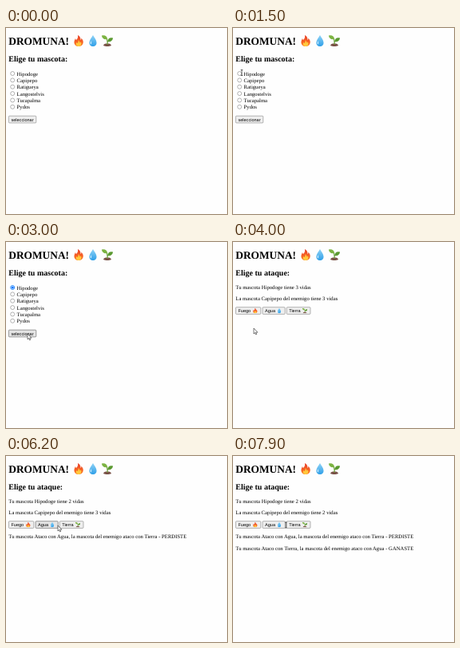
Recreate the animation shown at these times as an HTML page. Size 277 px wide and 233 px high, loop 8 s.

```html
<!DOCTYPE html>
<html lang="es">
<head>
<meta charset="utf-8">
<title>DROMUNA!</title>
<style>
html, body { margin: 0; width: 277px; height: 233px; overflow: hidden; background: #fefefe; }
svg { display: block; }
text { font: 6.69px "Liberation Serif", "Times New Roman", serif; fill: #000; text-rendering: geometricPrecision; white-space: pre; }
.h1 { font-size: 13.37px; font-weight: bold; }
.h2 { font-size: 10.03px; font-weight: bold; }
.btn text { font: 5.57px "Liberation Sans", Arial, sans-serif; }
.btn rect { fill: #efefef; stroke: #767676; stroke-width: .55; }
.btn.hot rect { fill: #e4e4e4; stroke: #4f4f4f; }
.btn.down rect { fill: #f5f5f5; stroke: #8d8d8d; }
.ring { fill: #fff; stroke: #767676; stroke-width: .55; }
.on .ring { stroke: #0075ff; stroke-width: .8; }
.dot { fill: #0075ff; visibility: hidden; }
.on .dot { visibility: visible; }
</style>
</head>
<body>
<svg id="stage" width="277" height="233" viewBox="0 0 277 233">
  <defs>
    <linearGradient id="heat" x1="0" y1="0" x2="0" y2="1">
      <stop offset="0" stop-color="#e8402c"/><stop offset="1" stop-color="#ff7a1f"/>
    </linearGradient>
    <linearGradient id="wet" x1="0" y1="0" x2="0" y2="1">
      <stop offset="0" stop-color="#8fd3f6"/><stop offset="1" stop-color="#2f9fe8"/>
    </linearGradient>
    <symbol id="fire" viewBox="0 0 28 28">
      <path fill="url(#heat)" d="M12 0C18 3 19 8 19 12C21 11 21 9 20 7C25 11 26 15 25 20C24 25 19 28 14 28C8 28 3 24 3 18C3 14 5 11 6 8C7 10 7 11 8 12C12 9 13 5 12 0Z"/>
      <path fill="#ffc83d" d="M13 12C17 15 16 18 18 19C19 18 19 17 19 16C23 21 20 28 14 28C8 28 6 22 9 18C10 19 10 20 11 20C13 18 14 15 13 12Z"/>
    </symbol>
    <symbol id="drop" viewBox="0 0 28 28">
      <path fill="url(#wet)" d="M14 0C17 6 23 12 23 19C23 24.500 19 28 14 28S5 24.500 5 19C5 12 11 6 14 0Z"/>
      <path fill="#d4f0ff" d="M10 14C7 18 7 21 9 23C11 22 10 18 10 14Z"/>
    </symbol>
    <symbol id="sprout" viewBox="0 0 28 28">
      <path fill="#795046" d="M4 26C6 21 10 21 14 21S22 21 24 26C21 28.500 7 28.500 4 26Z"/>
      <path fill="none" stroke="#689f38" stroke-width="2.500" d="M14 23C15 18 14 14 13 9M14 17C16 14 18 13 21 12"/>
      <path fill="#7cb342" d="M14 10C6 12 1 8 0 1C8 -1 14 3 14 10Z"/>
      <path fill="#5b9a32" d="M15 16C15 8 20 5 28 7C27 14 22 18 15 16Z"/>
    </symbol>
  </defs>
  <rect width="277" height="233" fill="#fefefe"/>
</svg>
<script>
const NS = 'http://www.w3.org/2000/svg';
const stage = document.getElementById('stage');
const LOOP = 8000;

function add(parent, tag, attrs = {}, content) {
  const el = document.createElementNS(NS, tag);
  for (const k in attrs) el.setAttribute(k, attrs[k]);
  if (content) el.textContent = content;
  return parent.appendChild(el);
}
const label = (parent, x, y, str, cls = '') => add(parent, 'text', { x, y, class: cls }, str);
const icon = (parent, id, cx, cy, size) =>
  add(parent, 'use', { href: '#' + id, x: cx - size / 2, y: cy - size / 2, width: size, height: size });

function button(parent, x, y, w, str, id, cx) {
  const g = add(parent, 'g', { class: 'btn' });
  add(g, 'rect', { x, y, width: w, height: 8.7, rx: 1 });
  label(g, x + 3, y + 6.3, str);
  if (id) icon(g, id, cx, y + 4.4, 6.5);
  return g;
}
const show = (el, on) => el.setAttribute('visibility', on ? 'visible' : 'hidden');
function press(el, hot, down) {
  el.setAttribute('class', 'btn' + (down ? ' down' : hot ? ' hot' : ''));
}

label(stage, 3.3, 20.7, 'DROMUNA!', 'h1');
icon(stage, 'fire', 91, 16, 14.2);
icon(stage, 'drop', 109, 16, 14.2);
icon(stage, 'sprout', 127, 16, 14.2);

// Pet selection
const pick = add(stage, 'g');
label(pick, 3.3, 42, 'Elige tu mascota:', 'h2');
const radios = ['Hipodoge', 'Capipepo', 'Ratigueya', 'Langostelvis', 'Tucapalma', 'Pydos'].map((name, i) => {
  const g = add(pick, 'g');
  const cy = 57 + i * 8.36;
  add(g, 'circle', { class: 'ring', cx: 8.2, cy, r: 2.5 });
  add(g, 'circle', { class: 'dot', cx: 8.2, cy, r: 1.55 });
  label(g, 13.6, cy + 2.6, name);
  return g;
});
const choose = button(pick, 3.4, 110.2, 34.4, 'seleccionar');

// Attack
const fight = add(stage, 'g');
label(fight, 3.3, 42, 'Elige tu ataque:', 'h2');
const mine = label(fight, 3.3, 59, ' ');
const foe = label(fight, 3.3, 73.2, ' ');
button(fight, 3.4, 81.7, 31.4, 'Fuego', 'fire', 27.8);
const agua = button(fight, 37, 81.7, 28.2, 'Agua', 'drop', 58);
const tierra = button(fight, 67.2, 81.7, 29.8, 'Tierra', 'sprout', 90);
const lost = label(fight, 3.3, 103.4, 'Tu mascota Ataco con Agua, la mascota del enemigo ataco con Tierra - PERDISTE');
const won = label(fight, 3.3, 117.6, 'Tu mascota Ataco con Tierra, la mascota del enemigo ataco con Agua - GANASTE');

const arrow = add(stage, 'path', {
  d: 'M0 0V7L1.600 5.600L2.700 8L3.700 7.500L2.700 5.200H4.900Z',
  fill: '#fff', stroke: '#222', 'stroke-width': .6
});
const beam = add(stage, 'path', {
  d: 'M-1.300 -3.500H1.300M0 -3.500V3.500M-1.300 3.500H1.300',
  fill: 'none', stroke: '#222', 'stroke-width': .7
});

// time, x, y
const track = [
  [1000, 206, 135], [1400, 11, 56], [1650, 11, 56], [1800, 8, 57], [2100, 8, 57],
  [2600, 27, 115], [3300, 27, 115], [3600, 26, 108], [4100, 26, 108],
  [4600, 47, 81], [5500, 47, 81], [6000, 65, 87], [6250, 65, 87],
  [6500, 78, 86], [7100, 78, 86], [7400, 66.3, 86.5], [8000, 66.3, 86.5]
];

function pointer(t) {
  let i = 0;
  while (i < track.length - 2 && t >= track[i + 1][0]) i++;
  const [t0, x0, y0] = track[i], [t1, x1, y1] = track[i + 1];
  const p = Math.min(1, Math.max(0, (t - t0) / (t1 - t0)));
  const e = p * p * (3 - 2 * p);
  return [x0 + (x1 - x0) * e, y0 + (y1 - y0) * e];
}
const within = (t, a, b) => t >= a && t < b;

function draw(t) {
  const fighting = t >= 3200, first = t >= 5200, second = t >= 6900;
  show(pick, !fighting);
  show(fight, fighting);
  pick.style.display = fighting ? 'none' : '';
  radios[0].setAttribute('class', t >= 1900 ? 'on' : '');
  mine.textContent = `Tu mascota Hipodoge tiene ${first ? 2 : 3} vidas`;
  foe.textContent = `La mascota Capipepo del enemigo tiene ${second ? 2 : 3} vidas`;
  show(lost, first);
  show(won, second);

  const [x, y] = pointer(t);
  const over = (a, b, top) => x >= a && x <= b && y >= top - 1 && y <= top + 9;
  press(choose, over(3, 38, 110), within(t, 3100, 3200));
  press(agua, over(37, 65.2, 81.7), within(t, 5100, 5200));
  press(tierra, over(67, 97, 81.7), within(t, 6800, 6900));

  const text = within(t, 1380, 1700) || t >= 7400;
  const at = `translate(${x.toFixed(2)} ${y.toFixed(2)})`;
  arrow.setAttribute('transform', at);
  beam.setAttribute('transform', at);
  show(arrow, t >= 1000 && !text);
  show(beam, text);
}

const start = performance.now();
function tick() {
  draw((performance.now() - start) % LOOP);
  requestAnimationFrame(tick);
}
draw(0);
requestAnimationFrame(tick);
</script>
</body>
</html>
```
